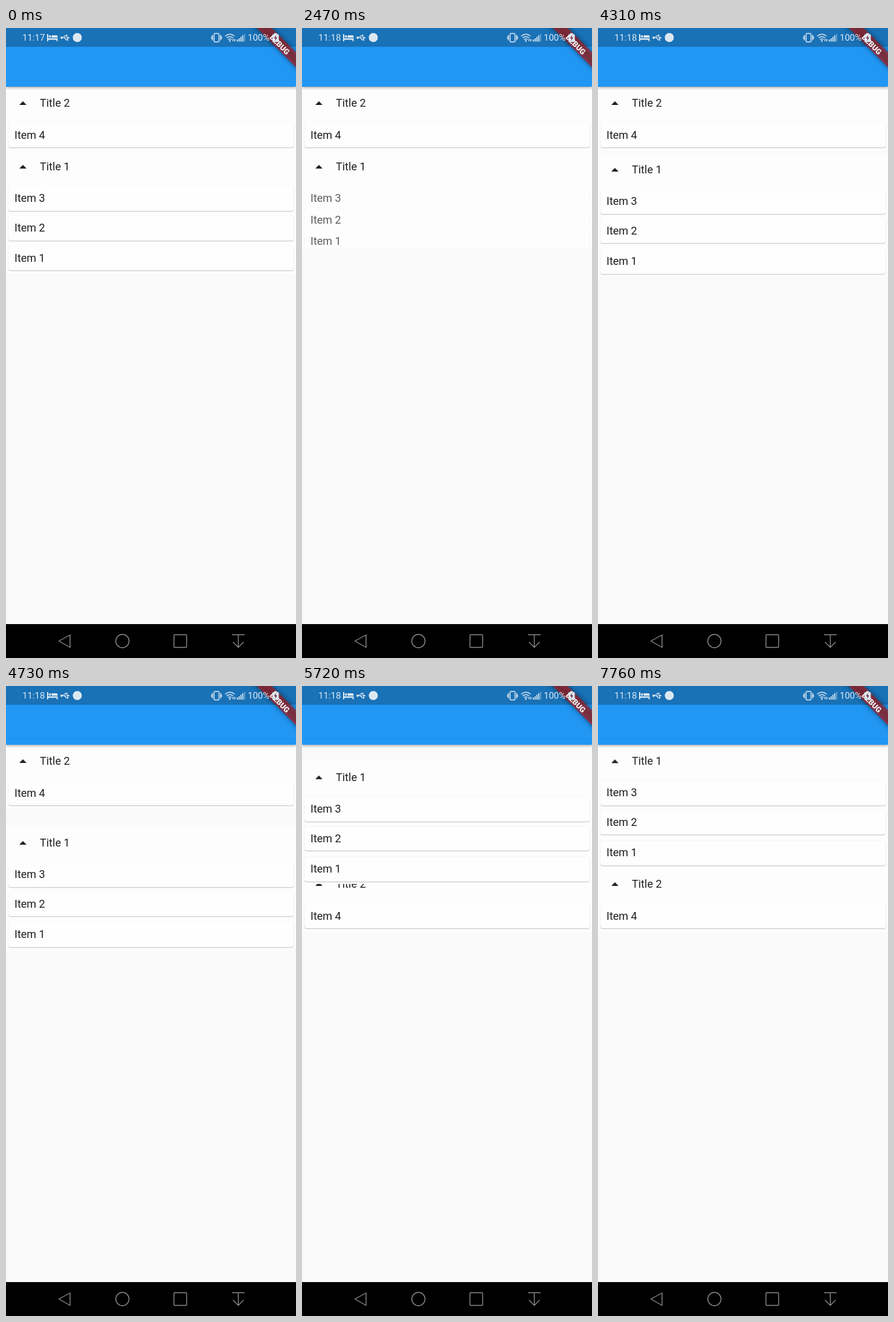
Write an HTML page that moves like this. It is 480 by 1040 pixels and loops after 8 s.

```html
<!DOCTYPE html>
<html lang="en">
<head>
<meta charset="utf-8">
<title>Reorderable groups</title>
<style>
html, body { margin: 0; width: 100%; height: 100%; overflow: hidden; }
body { position: relative; background: #fafafa; font: 18px Roboto, "Noto Sans", sans-serif; color: #1f1f1f; }
svg { position: absolute; left: 0; display: block; }

/* list */
.group { position: absolute; left: 0; width: 480px; background: #fdfdfd; }
.title { position: relative; height: 55.5px; line-height: 54px; padding-left: 56px; }
.title svg { left: 22px; top: 24px; }
.row { height: 49.2px; overflow: hidden; }
.card {
  margin: 4px; height: 40.5px; line-height: 40px; padding-left: 10px;
  border-radius: 4px; background: #fefefe;
  box-shadow: 0 1px 1.5px rgba(0, 0, 0, .24), 0 0 1px rgba(0, 0, 0, .1);
}
#second { top: 97px; animation: swap 8s linear infinite; }
#first { top: 201.7px; animation: drag 8s linear infinite; }
#first .row { animation: fold 8s linear infinite; }
#first .title svg { animation: flip 8s step-end infinite; }

@keyframes fold {
  0% { height: 49.2px; opacity: 1; }
  6.25% { height: 49.2px; opacity: 1; animation-timing-function: cubic-bezier(.333, 0, .667, .333); }
  14.25% { height: 0; opacity: 0; }
  27% { height: 0; opacity: 0; animation-timing-function: cubic-bezier(.333, .667, .667, 1); }
  35.25%, 100% { height: 49.2px; opacity: 1; }
}
@keyframes flip {
  0% { transform: none; }
  6.25% { transform: scaleY(-1); }
  27%, 100% { transform: none; }
}
@keyframes drag {
  0%, 53.87% { transform: none; }
  53.875% { transform: translateY(5px); }
  55.125% { transform: translateY(5px); animation-timing-function: ease-in-out; }
  59% { transform: translateY(30px); animation-timing-function: ease-in-out; }
  64.375%, 65.625% { transform: translateY(1px); }
  71.5% { transform: translateY(-78px); animation-timing-function: ease-out; }
  73.75%, 75% { transform: translateY(-100px); }
  80.75%, 82% { transform: translateY(-117px); }
  84.25% { transform: translateY(-120px); }
  85.5% { transform: translateY(-120px); animation-timing-function: ease-out; }
  89.625%, 100% { transform: translateY(-104.7px); }
}
@keyframes swap {
  0% { transform: none; }
  68.5% { transform: none; animation-timing-function: ease-in-out; }
  71.25%, 100% { transform: translateY(203.1px); }
}

/* bars */
#appbar {
  position: absolute; top: 0; left: 0; width: 480px; height: 97px;
  background: linear-gradient(#1971b6 31px, #2196f3 31px);
  box-shadow: 0 2px 4px rgba(0, 0, 0, .3);
}
#status { top: 0; font-size: 15px; }
#before { animation: until 8s step-end infinite; }
#after { animation: since 8s step-end infinite; }
@keyframes until { 0% { opacity: 1; } 16.75%, 100% { opacity: 0; } }
@keyframes since { 0% { opacity: 0; } 16.75%, 100% { opacity: 1; } }
#nav { top: 984px; background: #000; }
</style>
</head>
<body>
<div class="group" id="second">
  <div class="title">Title 2<svg width="12" height="6"><path d="M0 6 6 0l6 6z" fill="#1f1f1f"/></svg></div>
  <div class="row"><div class="card">Item 4</div></div>
</div>
<div class="group" id="first">
  <div class="title">Title 1<svg width="12" height="6"><path d="M0 6 6 0l6 6z" fill="#1f1f1f"/></svg></div>
  <div class="row"><div class="card">Item 3</div></div>
  <div class="row"><div class="card">Item 2</div></div>
  <div class="row"><div class="card">Item 1</div></div>
</div>

<div id="appbar"></div>
<svg id="status" width="480" height="97" fill="#dbe8f2">
  <!-- corner ribbon -->
  <path d="M395-20h25l80 80v25z" fill="#000" opacity=".5" style="filter: blur(4px)"/>
  <path d="M415 0h25l40 40v25z" fill="#b71c1c" opacity=".63"/>
  <text transform="translate(453 27.5) rotate(45)" y="4.4" text-anchor="middle" font-size="12.6" font-weight="900" fill="#f8f4f4">DEBUG</text>

  <text id="before" x="27" y="21.3">11:17</text>
  <text id="after" x="27" y="21.3">11:18</text>
  <!-- bed -->
  <path d="M68 10h2v7h15.500v5h-1.800v-2.500H70V22h-2zM75.500 12h8q2 0 2 2v2h-10z"/>
  <circle cx="72.700" cy="14" r="1.900"/>
  <!-- usb -->
  <path d="M92 16h10M94.500 16l3-3.500h2M96.500 16l3 3.500h2" fill="none" stroke="#dbe8f2" stroke-width="1.200"/>
  <path d="M101.500 13.800 105.500 16l-4 2.200zM99 11.300h2.500v2.500H99zM100.500 18.200h2.500v2.500h-2.500z"/>
  <circle cx="92" cy="16" r="1.900"/>
  <circle cx="118" cy="15.800" r="7.500"/>
  <!-- vibrate, wifi -->
  <g fill="none" stroke="#dbe8f2" stroke-width="1.400">
    <rect x="344.500" y="9" width="8" height="14" rx="1"/>
    <path d="M342 11.500v9M355 11.500v9M340.400 13.500v5M356.600 13.500v5"/>
    <path d="M362.500 13.500q8-6.500 16 0M365 16.500q5.500-4.500 11 0M367.500 19.300q3-2.500 6 0"/>
  </g>
  <circle cx="370.500" cy="21.300" r="1.400"/>
  <path d="M375 18h1.500v4H375zM378 18h1.500v4H378z"/>
  <!-- signal -->
  <path d="M382 19h1.800v3.500H382zM385 17h1.800v5.500H385zM388 14.500h1.800v8H388zM391 12h1.800v10.500H391z"/>
  <path d="M394 9.500h1.800v13H394z" opacity=".45"/>
  <text x="400" y="21.300">100%</text>
  <!-- battery -->
  <path d="M444 8.500h4.500v1.700h2q1 0 1 1V22q0 1-1 1h-8.500q-1 0-1-1V11.200q0-1 1-1h2z"/>
  <path d="M447 11.500 443.500 17h2.500l-.7 4.500 3.700-6h-2.500z" fill="#7a3045"/>
</svg>

<svg id="nav" width="480" height="56" fill="none" stroke="#8c8c8c" stroke-width="1.400" stroke-linejoin="round" stroke-linecap="round">
  <path d="M87.500 28 106 18v20.500z"/>
  <circle cx="192.700" cy="28" r="11"/>
  <rect x="278" y="17.500" width="21" height="21" rx="1.500"/>
  <path d="M374.500 17.500h20M384.500 17.500v20.500M376 30l8.500 8.500L393 30"/>
</svg>
</body>
</html>
```
